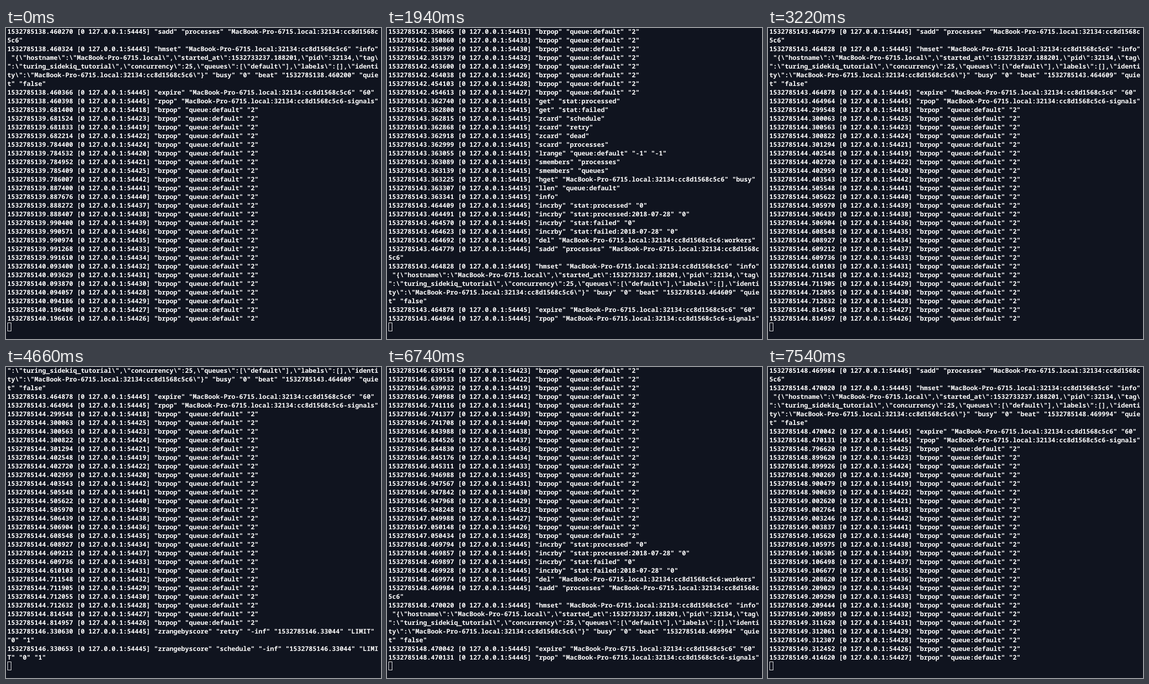
Write an HTML page that moves like this. It is 776 px wide and 644 px high and loops after 8000 ms.

```html
<!DOCTYPE html>
<html lang="en">
<head>
<meta charset="utf-8">
<title>Queue monitor</title>
<style>
  html, body { margin: 0; width: 100%; height: 100%; overflow: hidden; background: #10141f; }
  #screen {
    position: absolute; left: 2.7px; top: -2px; margin: 0;
    font: 700 13.333px/18px "Noto Sans Mono", "DejaVu Sans Mono", monospace;
    font-variant-ligatures: none;
    text-rendering: geometricPrecision;
    white-space: pre; color: #fff;
  }
  #cursor {
    position: absolute; left: 3px; top: 610px; width: 8px; height: 18px;
    box-sizing: border-box; border: 1px solid #fff;
  }
</style>
</head>
<body>
<pre id="screen"></pre>
<div id="cursor"></div>
<script>
const COLUMNS = 96, ROWS = 34, LOOP = 8000;
const HOST = 'MacBook-Pro-6715.local';
const WORKER = HOST + ':32134:cc8d1568c5c6';
const INFO = `{"hostname":"${HOST}","started_at":1532733237.188201,"pid":32134,`
  + '"tag":"turing_sidekiq_tutorial","concurrency":25,"queues":["default"],'
  + `"labels":[],"identity":"${WORKER}"}`;

let seed = 28;
function random(min, max) {
  seed = (seed * 1664525 + 1013904223) % 2 ** 32;
  return min + (max - min) * seed / 2 ** 32;
}

const stamp = (time, digits = 6) => '1532785' + time.toFixed(digits);
const log = [];

function add(time, port, command) {
  const args = command.split(' ').map(arg => `"${arg.replace(/"/g, '\\"')}"`).join(' ');
  const line = `${stamp(time)} [0 127.0.0.1:${port}] ${args}`;
  log.push({ time, rows: line.match(new RegExp(`.{1,${COLUMNS}}`, 'g')) });
}

// Commands sent over one connection, some microseconds apart.
function run(time, port, commands) {
  for (const command of commands) {
    add(time, port, command);
    time += random(8e-6, 9e-5);
  }
}

// The low ports wake first, the others roughly from high to low.
function wakeOrder() {
  const rank = port => (port < 54426 ? 0 : 54450 - port) + random(0, 4);
  return Array.from({ length: 25 }, (_, i) => 54418 + i)
    .map(port => ({ port, rank: rank(port) }))
    .sort((a, b) => a.rank - b.rank)
    .map(client => client.port);
}

// 25 clients poll in groups about 0.1 s apart: a partial group, then a 5-4-5 pattern.
function poll(start, firstGroup) {
  const ports = wakeOrder();
  for (let group = 0, size = firstGroup; ports.length; group++) {
    let time = start + group * 0.103;
    for (const port of ports.splice(0, size)) {
      add(time, port, 'brpop queue:default 2');
      time += random(6e-5, 6e-4);
    }
    size = group % 3 === 1 ? 4 : 5;
  }
}

function heartbeat(time) {
  run(time, 54445, [
    'incrby stat:processed 0',
    'incrby stat:processed:2018-07-28 0',
    'incrby stat:failed 0',
    'incrby stat:failed:2018-07-28 0',
    `del ${WORKER}:workers`,
    `sadd processes ${WORKER}`,
    `hmset ${WORKER} info ${INFO} busy 0 beat ${stamp(time + 0.0002)} quiet false`,
    `expire ${WORKER} 60`,
    `rpop ${WORKER}-signals`
  ]);
}

function dashboard(time) {
  run(time, 54415, [
    'get stat:processed', 'get stat:failed',
    'zcard schedule', 'zcard retry', 'zcard dead',
    'scard processes', 'lrange queue:default -1 -1',
    'smembers processes', 'smembers queues',
    `hget ${WORKER} busy`, 'llen queue:default', 'info'
  ]);
}

function schedule(time) {
  const score = stamp(time - 0.00019, 5);
  run(time, 54445, ['retry', 'schedule'].map(set => `zrangebyscore ${set} -inf ${score} LIMIT 0 1`));
}

heartbeat(138.46);
poll(139.6814, 4);
poll(141.9386, 2);
dashboard(143.36274);
heartbeat(143.464409);
poll(144.299548 - 0.103, 0);
schedule(146.33063);
poll(146.534988, 3);
heartbeat(148.469794);
poll(148.79662, 1);

// The screen refreshes every 160 ms; each refresh advances the log clock by 1/6 s.
const logClock = ms => 141.425 + (Math.floor((ms - 20) / 160) + 1) / 6;

const screenEl = document.getElementById('screen');
let shown = -1;

function draw() {
  const now = logClock(performance.now() % LOOP);
  if (now !== shown) {
    shown = now;
    screenEl.textContent = log.filter(entry => entry.time <= now)
      .flatMap(entry => entry.rows).slice(-ROWS).join('\n');
  }
  requestAnimationFrame(draw);
}
draw();
</script>
</body>
</html>
```
